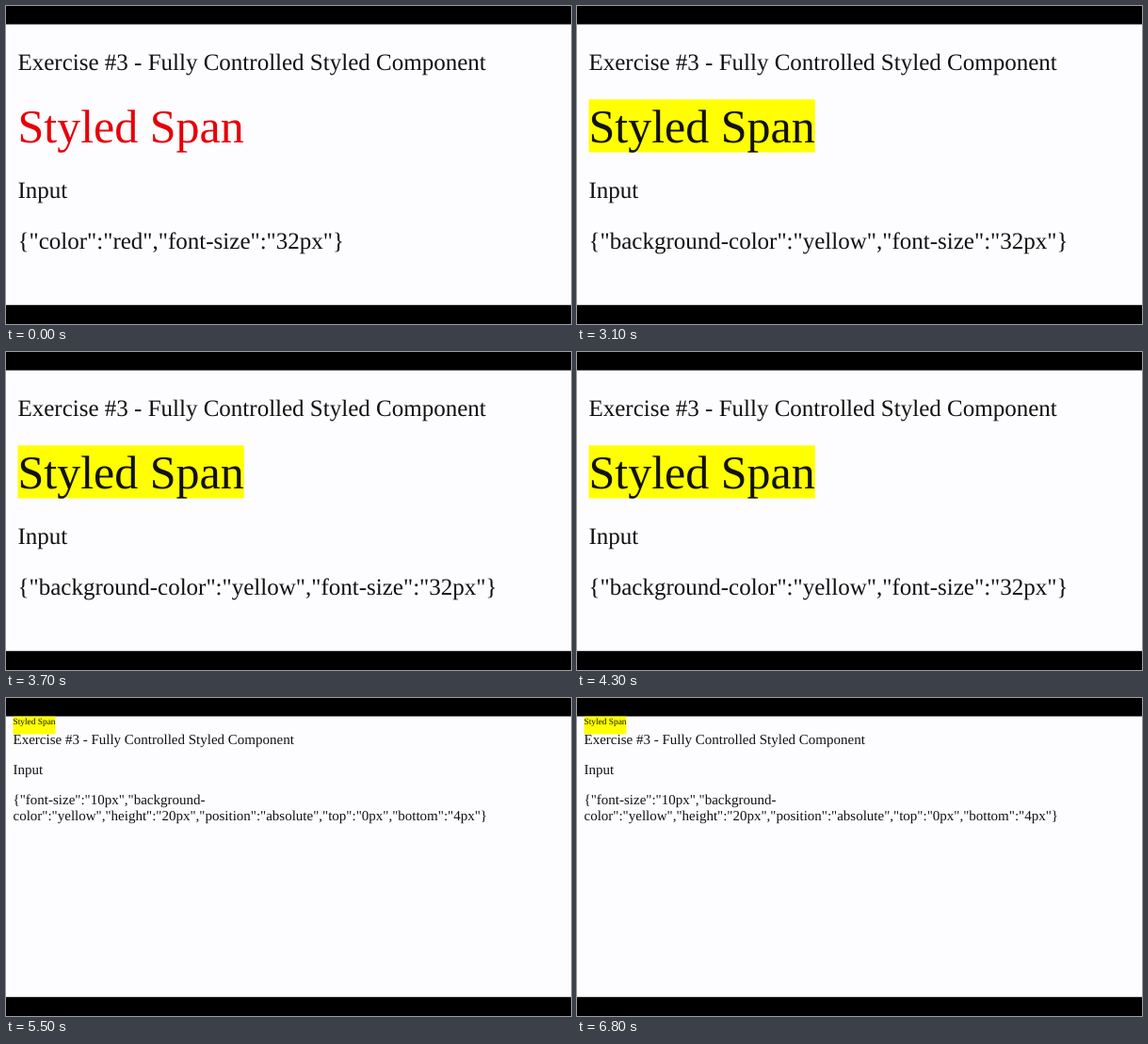
Recreate the animation shown at these times as an HTML page. Size 600x338 px, loop 7.5 s.

```html
<!DOCTYPE html>
<html lang="en">
<head>
<meta charset="utf-8">
<title>Styled Span</title>
<style>
  html, body { margin: 0; width: 100%; height: 100%; overflow: hidden; background: #000; }
  svg { display: block; width: 600px; height: 338px; font: 25px "Liberation Serif", "Times New Roman", serif; fill: #111; text-rendering: geometricPrecision; }
  .page { fill: #fdfcfe; }
  .mark { fill: #ff0; }
  .title { font-size: 50px; }
  .small { font-size: 15px; }
  .tiny { font-size: 9.375px; }
</style>
</head>
<body>
<svg viewBox="0 0 600 338">
  <rect class="page" y="19.5" width="600" height="298.3"/>
  <g id="large">
    <rect class="mark" id="highlight" x="12.5" y="99.3" width="240.3" height="56.2"/>
    <text x="12.5" y="67.7">Exercise #3 - Fully Controlled Styled Component</text>
    <text class="title" id="span" x="12.5" y="144.7">Styled Span</text>
    <text x="12.5" y="204.3">Input</text>
    <text id="json" x="12.5" y="257.5"></text>
  </g>
  <g id="compact" class="small">
    <rect class="mark" x="7.5" y="19.7" width="45" height="18.8"/>
    <text class="tiny" x="7.5" y="28.2">Styled Span</text>
    <text x="7.5" y="48.8">Exercise #3 - Fully Controlled Styled Component</text>
    <text x="7.5" y="80.7">Input</text>
    <text x="7.5" y="112.9">{"font-size":"10px","background-</text>
    <text x="7.5" y="129.9">color":"yellow","height":"20px","position":"absolute","top":"0px","bottom":"4px"}</text>
  </g>
</svg>
<script>
  const LOOP = 7500, YELLOW_AT = 3100, COMPACT_AT = 5500;
  const el = id => document.getElementById(id);
  const show = (id, on) => el(id).setAttribute("visibility", on ? "visible" : "hidden");
  const start = performance.now();
  let last;

  function render(now) {
    const t = Math.max(0, now - start) % LOOP;
    const scene = t < YELLOW_AT ? 0 : t < COMPACT_AT ? 1 : 2;
    if (scene !== last) {
      last = scene;
      const style = scene ? { "background-color": "yellow" } : { color: "red" };
      el("json").textContent = JSON.stringify({ ...style, "font-size": "32px" });
      el("span").setAttribute("fill", scene ? "#111" : "#e60009");
      show("large", scene < 2);
      show("highlight", scene === 1);
      show("compact", scene === 2);
    }
    requestAnimationFrame(render);
  }
  render(start);
</script>
</body>
</html>
```
